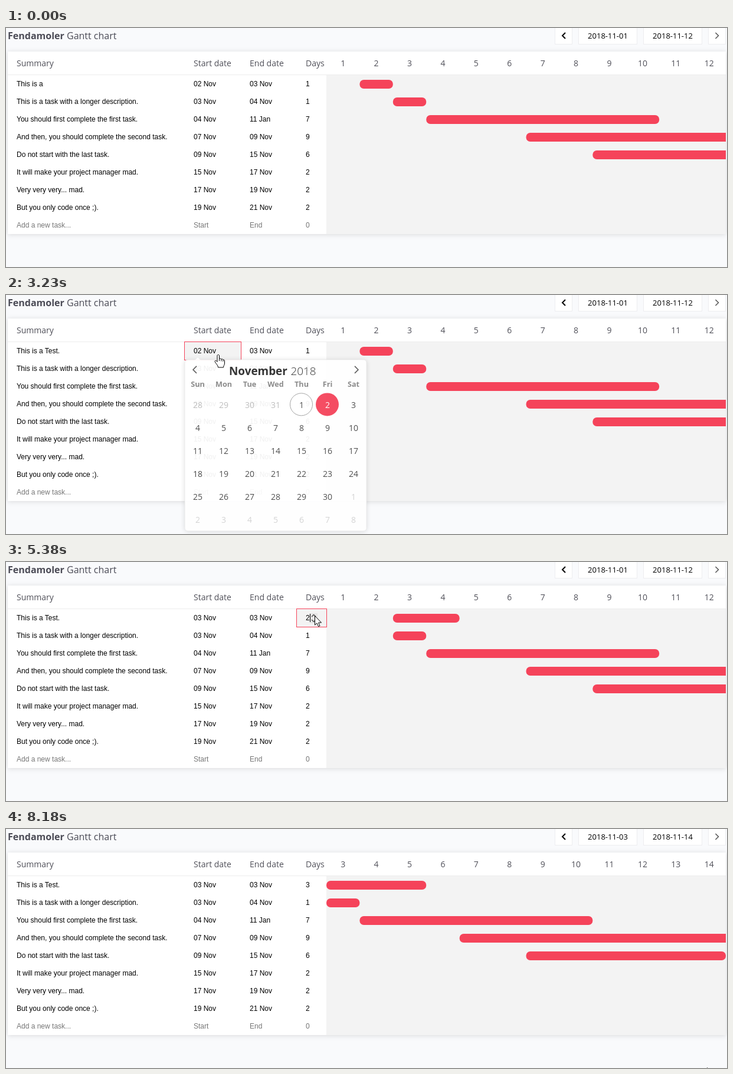
These frames come from a looping animation (1222x406 px, 8.26 s). An HTML page:

```html
<!DOCTYPE html>
<html lang="en">
<head>
<meta charset="utf-8">
<title>Gantt chart</title>
<style>
  html, body { margin: 0; width: 100%; height: 100%; overflow: hidden; background: #f9fafc; }
  svg { display: block; width: 1222px; height: 406px; }
  text { font: 14px "Open Sans", sans-serif; fill: #505059; white-space: pre; }
  .title { font-size: 16px; fill: #4b4b56; }
  .date { font-size: 13px; fill: #000; }
  .cell { font: 12px "Liberation Sans", Arial, sans-serif; fill: #000; }
  .hint { fill: #757575; }
  .bold { font-weight: 700; }
  .mid { text-anchor: middle; }
  .line { fill: none; stroke: #555; stroke-width: 1.5; }
  .month { font-size: 18.9px; fill: #2b2b2b; }
  .weekday { font-size: 12.6px; font-weight: 700; fill: #868686; }
  .day { fill: #474747; }
  .before { fill: #bbb; }
  .after { fill: #d2d2d2; }
  .picked { fill: #fff; }
  .card { filter: drop-shadow(0 1px 4px rgba(0,0,0,.13)); }
</style>
</head>
<body>
<svg id="stage" viewBox="0 0 1222 406"></svg>
<script>
const LOOP = 8260, TICK = 77, RED = '#f5435a', GREY = '#f3f3f3';
const GRID_X = 543, GRID_END = 1220, DAY_W = (GRID_END - GRID_X) / 12;
const COLS = [3, 303, 398, 493, 543];
const stage = document.getElementById('stage');

function add(parent, tag, attrs = {}, content) {
  const el = document.createElementNS('http://www.w3.org/2000/svg', tag);
  set(el, attrs);
  if (content !== undefined) el.textContent = content;
  parent.append(el);
  return el;
}
function set(el, attrs) {
  for (const key in attrs) el.setAttribute(key, attrs[key]);
}
const show = (el, on) => { el.style.display = on ? '' : 'none'; };
const rect = (parent, x, y, width, height, fill, more) =>
  add(parent, 'rect', { x, y, width, height, fill, ...more });
const label = (parent, x, y, cls, content) =>
  add(parent, 'text', { x, y, class: cls }, content);
const line = (parent, d, more) => add(parent, 'path', { d, class: 'line', ...more });

// Title and toolbar
label(stage, 3, 18.5, 'title bold', 'Fendamoler');
label(stage, 103, 18.5, 'title', 'Gantt chart');
const button = (x, w) =>
  rect(stage, x + .5, -2.5, w - 1, 30, '#fff', { stroke: '#ededf0' });
button(930, 30);
button(970, 100);
button(1080, 100);
const nextButton = button(1190, 30);
line(stage, 'M948 8l-5 5 5 5', { style: 'stroke:#000;stroke-width:2' });
line(stage, 'M1202.5 8l5 5-5 5');
const fromDate = label(stage, 1020, 18, 'date mid');
const toDate = label(stage, 1130, 18, 'date mid');

// Table
rect(stage, 3, 40, 1217, 310, '#fff', { class: 'card' });
rect(stage, 3, 79, 1217, 1, '#ededed');
rect(stage, GRID_X, 80, GRID_END - GRID_X, 270, GREY);
['Summary', 'Start date', 'End date', 'Days'].forEach((name, i) =>
  label(stage, COLS[i] + 15, 65, '', name));
const dayLabels = Array.from({ length: 12 }, (_, i) =>
  label(stage, GRID_X + DAY_W * (i + .5), 65, 'mid'));

const hoverBox = rect(stage, 0, 80, 0, 30, GREY);
const rows = [
  ['This is a ', '02 Nov', '03 Nov', 1],
  ['This is a task with a longer description.', '03 Nov', '04 Nov', 1],
  ['You should first complete the first task.', '04 Nov', '11 Jan', 7],
  ['And then, you should complete the second task.', '07 Nov', '09 Nov', 9],
  ['Do not start with the last task.', '09 Nov', '15 Nov', 6],
  ['It will make your project manager mad.', '15 Nov', '17 Nov', 2],
  ['Very very very... mad.', '17 Nov', '19 Nov', 2],
  ['But you only code once ;).', '19 Nov', '21 Nov', 2],
  ['Add a new task...', 'Start', 'End', 0],
];
const cells = rows.map((row, r) => row.map((value, c) =>
  label(stage, COLS[c] + 15, 99 + 30 * r, r === 8 ? 'cell hint' : 'cell', value)));

const clip = add(add(stage, 'defs'), 'clipPath', { id: 'grid' });
rect(clip, GRID_X, 80, GRID_END - GRID_X, 270);
const chart = add(stage, 'g', { 'clip-path': 'url(#grid)' });
const bars = rows.slice(0, 8).map((_, r) =>
  rect(chart, 0, 88 + 30 * r, 0, 15, RED, { rx: 7 }));

const spinner = add(stage, 'g');
rect(spinner, 515, -8, 13, 17, '#e6e6e6');
line(spinner, 'M518 -2l3.5-3.5 3.5 3.5M518 3l3.5 3.5 3.5-3.5');
const focusBox = rect(stage, 0, 79.5, 0, 31, 'none', { stroke: RED });
const caret = rect(stage, 0, 88, 1, 14, '#000');

// Date picker
const picker = add(stage, 'g');
rect(picker, 303, 111, 308, 291, '#fff',
  { rx: 5, stroke: '#e6e6e6', 'stroke-width': .8, class: 'card' });
add(picker, 'path', { d: 'M320 112l5-5 5 5z', fill: '#fff' });
line(picker, 'M323 122l-6 6 6 6M591 122l6 6-6 6');
label(picker, 378, 137, 'month bold', 'November');
label(picker, 482.5, 137, 'month', '2018').style.fontWeight = 300;
['Sun', 'Mon', 'Tue', 'Wed', 'Thu', 'Fri', 'Sat'].forEach((name, i) =>
  label(picker, 325 + 44 * i, 157, 'weekday mid', name));
const dayHover = add(picker, 'circle', { r: 19, fill: '#e6e6e6' });
add(picker, 'circle', { cx: 500.5, cy: 187, r: 19, fill: 'none', stroke: '#a0a0a0' });
add(picker, 'circle', { cx: 544.5, cy: 187, r: 19.5, fill: RED });
for (let i = 0; i < 42; i++) {
  const day = i - 3;
  const kind = day < 1 ? 'before' : day > 30 ? 'after' : day === 2 ? 'picked' : 'day';
  const number = day < 1 ? day + 31 : day > 30 ? day - 30 : day;
  label(picker, 325 + 44 * (i % 7), 193 + 39 * Math.floor(i / 7), 'mid ' + kind, number);
}

// Pointers, hotspot at the origin
const shape = { fill: '#fff', stroke: '#000', 'stroke-linejoin': 'round' };
const pointers = {
  arrow: add(stage, 'path', { d: 'M.5 .5V16L4 12.8 6.5 18.5 9 17.4 6.6 12H11.5Z', ...shape }),
  hand: add(stage, 'path', {
    d: 'M-2 2C-2 0 1.5 0 1.5 2V7.5C2.5 6.5 4.5 6.8 4.8 8.3C6 7.3 7.6 7.8 7.9 9.2' +
       'C9 8.6 10.5 9.2 10.5 11V15C10.5 18 8.5 19 8.5 22H-.5C-.5 19-3 17-5.5 13' +
       'C-7 10.5-4.5 9.5-3.2 11L-2 12.5ZM1.5 7.5V11M4.8 8.5V11.5M7.9 9.5V12', ...shape }),
  beam: add(stage, 'path', {
    d: 'M-3.5-7.5h2.5l1 1 1-1h2.5M-3.5 7.5h2.5l1-1 1 1h2.5M0-7v14',
    fill: 'none', stroke: '#222', 'stroke-width': 1.2 }),
};

// Pointer route: time, x, y
const route = [
  [67, 748, 297], [300, 400, 190], [590, 130, 97], [750, 123.5, 96],
  [2230, 123.5, 96], [2300, 126.5, 96], [2370, 146, 101], [2520, 146, 101],
  [2850, 345, 104], [3000, 360, 101], [3300, 360, 101], [3640, 588, 184],
  [3850, 588, 184], [4148, 528, 95], [4300, 513, 87], [4600, 513, 87],
  [4990, 522, 92], [5300, 523, 91], [5610, 523, 91], [5900, 760, 80],
  [6300, 1213, 4], [6450, 1213, 4], [6540, 1212, 5], [6990, 1212, 5],
  [7200, 1195, 120], [7459, 1141, 381], [7536, 1146, 395], [7613, 1152, 407],
  [8140, 1188, 407], [8152, 1188, 404.5],
];

// Changes of state in order of time
const steps = [
  [0, { text: 'This is a ', start: 2, days: 1, view: 1, focus: -1, caret: false, opened: 0 }],
  [680, { focus: 0, caret: true }],
  [1060, { text: 'This is a T' }],
  [1290, { text: 'This is a Te' }],
  [1520, { text: 'This is a Tes' }],
  [1590, { text: 'This is a Test' }],
  [1840, { text: 'This is a Test.' }],
  [3060, { focus: 1, caret: false, opened: 3070 }],
  [3770, { start: 3, opened: 0 }],
  [4680, { focus: 3, caret: true }],
  [5220, { days: 2 }],
  [5610, { days: 3 }],
  [5990, { caret: false }],
  [6760, { focus: -1, view: 2 }],
  [6910, { view: 3 }],
];

const two = n => String(n).padStart(2, '0');

function pointerAt(t) {
  const i = route.findIndex(p => p[0] > t);
  if (i === 0) return [-50, -50];
  if (i < 0) return route[route.length - 1].slice(1);
  const [t0, x0, y0] = route[i - 1], [t1, x1, y1] = route[i];
  const k = (t - t0) / (t1 - t0);
  return [x0 + (x1 - x0) * k, y0 + (y1 - y0) * k];
}

function render(time) {
  const state = {};
  for (const [at, change] of steps) if (at <= time) Object.assign(state, change);

  // The screen refreshes once per tick
  const t = Math.max(0, Math.floor((time + 10) / TICK) * TICK - 10);
  const [x, y] = pointerAt(t);

  cells[0][0].textContent = state.text;
  cells[0][1].textContent = two(state.start) + ' Nov';
  cells[0][3].textContent = state.days;
  fromDate.textContent = '2018-11-' + two(state.view);
  toDate.textContent = '2018-11-' + two(state.view + 11);
  dayLabels.forEach((el, i) => { el.textContent = state.view + i; });
  bars.forEach((bar, r) => {
    const first = r ? parseInt(rows[r][1], 10) : state.start;
    const length = r ? rows[r][3] : state.days;
    set(bar, { x: GRID_X + (first - state.view) * DAY_W, width: length * DAY_W });
  });

  const open = state.opened > 0;
  const inPicker = open && x > 303 && x < 611 && y > 111;
  const row = Math.floor((y - 80) / 30);
  const col = row < 0 || row > 8 || x < 3 || inPicker
    ? -1 : COLS.findIndex((left, i) => i < 4 && x >= left && x < COLS[i + 1]);
  const overNext = x >= 1190 && x < 1220 && y < 28;
  nextButton.setAttribute('fill', overNext ? GREY : '#fff');
  show(hoverBox, col >= 0);
  if (col >= 0) set(hoverBox, { x: COLS[col], y: 80 + 30 * row, width: COLS[col + 1] - COLS[col] });

  const { focus } = state;
  show(focusBox, focus >= 0);
  if (focus >= 0) set(focusBox, { x: COLS[focus] - .5, width: COLS[focus + 1] - COLS[focus] + 1 });
  show(caret, state.caret);
  if (state.caret) {
    const cell = cells[0][focus];
    caret.setAttribute('x', Math.round(COLS[focus] + 15 + cell.getComputedTextLength()));
  }
  show(spinner, focus === 3 || col === 3);
  spinner.setAttribute('transform', `translate(0 ${95 + (col === 3 ? 30 * row : 0)})`);

  show(picker, open);
  if (open) {
    const left = (1 - Math.min(1, Math.max(0, (t - state.opened) / 300))) ** 4;
    set(picker, { opacity: 1 - left, transform: `translate(0 ${-20 * left})` });
  }
  const overDay = inPicker && y > 168;
  show(dayHover, overDay);
  if (overDay) set(dayHover, {
    cx: 324.5 + 44 * Math.floor((x - 303) / 44),
    cy: 187 + 39 * Math.floor((y - 168) / 39),
  });

  const kind = col === 0 ? 'beam'
    : overNext || overDay || col === 1 || col === 2 || (col === 3 && x < 516) ? 'hand' : 'arrow';
  for (const name in pointers) show(pointers[name], name === kind);
  pointers[kind].setAttribute('transform', `translate(${Math.round(x)} ${Math.round(y)})`);
}

const begin = performance.now();
function frame() {
  render((performance.now() - begin) % LOOP);
  requestAnimationFrame(frame);
}
frame();
</script>
</body>
</html>
```
